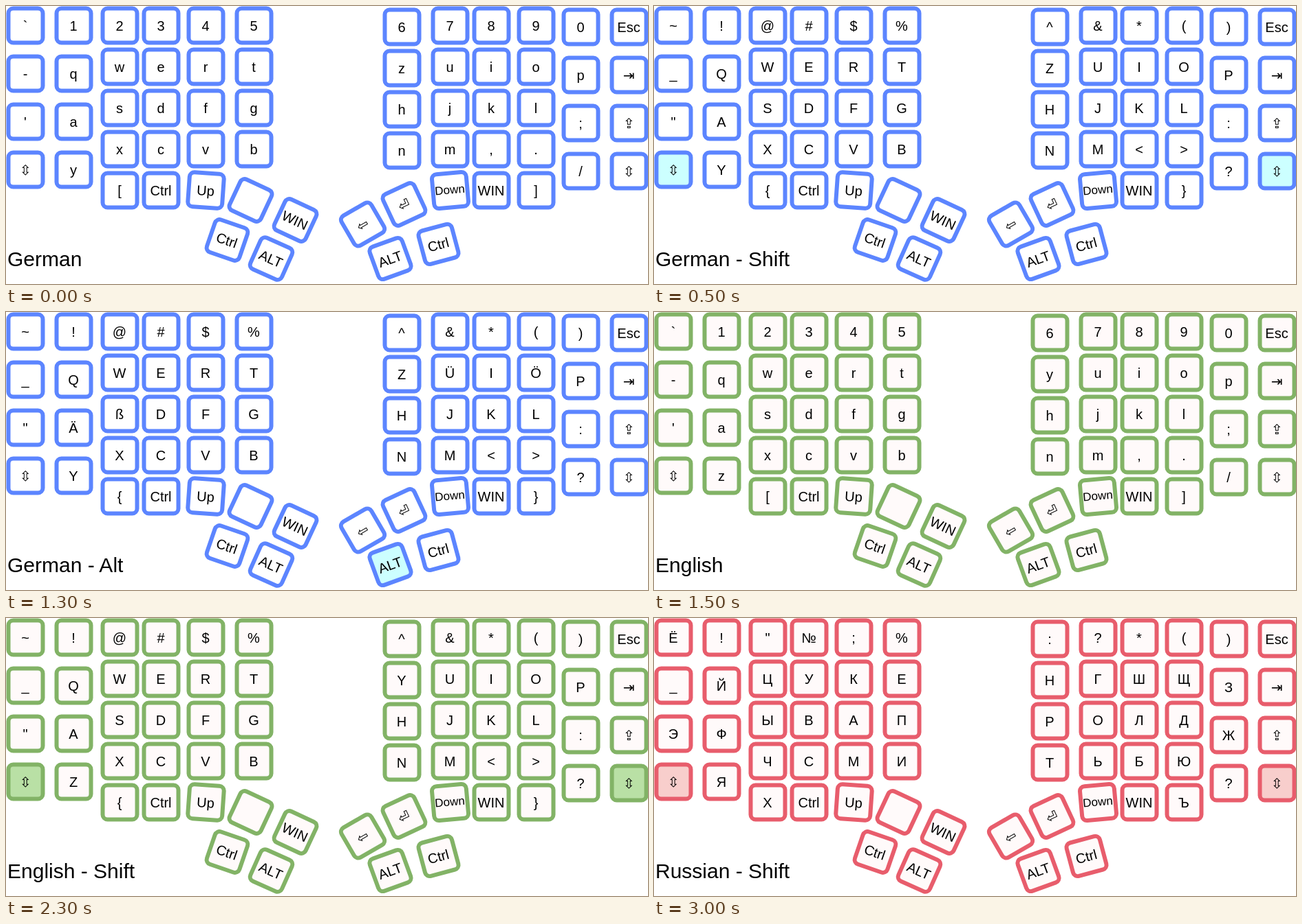
Animation of 933 by 405 pixels, one loop 3500 ms. Source, as an HTML page:

```html
<!DOCTYPE html>
<html lang="en">
<meta charset="utf-8">
<title>Keyboard layouts</title>
<style>
html, body { margin: 0; width: 100%; height: 100%; overflow: hidden; background: #fff; }
svg { display: block; font: 20px "Liberation Sans", "DejaVu Sans", sans-serif; }
rect { fill: var(--face); stroke: var(--edge); stroke-width: 6px; }
.on rect { fill: var(--lit); }
.key text { text-anchor: middle; }
#title { font-size: 30px; }
</style>
<svg id="board" width="933" height="405" viewBox="0 0 933 405"><text id="title" x="2" y="379"></text></svg>
<script>
const board = document.getElementById('board');
const title = document.getElementById('title');

const blue = ['#5c85ff', '#ffffff', '#ccffff'];
const green = ['#82b366', '#fffafa', '#b9e0a5'];
const red = ['#e85d6c', '#fffafa', '#f8cecc'];

// Characters run down each column, columns from left to right.
const layers = [
  ['German', blue, "`-' 1qay 2wsx[ 3edc 4rfv 5tgb 6zhn 7ujm 8ik, 9ol.] 0p;/"],
  ['German - Shift', blue, '~_" !QAY @WSX{ #EDC $RFV %TGB ^ZHN &UJM *IK< (OL>} )P:?', 'shift'],
  ['German - Alt', blue, '~_" !QÄY @WßX{ #EDC $RFV %TGB ^ZHN &ÜJM *IK< (ÖL>} )P:?', 'alt'],
  ['English', green, "`-' 1qaz 2wsx[ 3edc 4rfv 5tgb 6yhn 7ujm 8ik, 9ol.] 0p;/"],
  ['English - Shift', green, '~_" !QAZ @WSX{ #EDC $RFV %TGB ^YHN &UJM *IK< (OL>} )P:?', 'shift'],
  ['Russian', red, 'Ё-э 1йфя 2цычх 3увс 4кам 5епи 6нрт 7гоь 8шлб 9щдюъ 0зж/'],
  ['Russian - Shift', red, 'Ё_Э !ЙФЯ "ЦЫЧХ №УВС ;КАМ %ЕПИ :НРТ ?ГОЬ *ШЛБ (ЩДЮЪ )ЗЖ?', 'shift'],
];

// x, first y, row step, number of keys
const columns = [
  [28, 28, 70, 3], [98, 28, 70, 4], [165, 28, 60, 5], [225, 28, 60, 4],
  [290, 28, 60, 4], [360, 28, 60, 4], [575, 30, 60, 4], [645, 28, 60, 4],
  [705, 28, 60, 4], [770, 28, 60, 5], [835, 30, 70, 4],
];

// label, x, y, angle, role, font size
const fixedKeys = [
  ['⇳', 28, 238, 0, 'shift'], ['Ctrl', 225, 268], ['Up', 290, 268, 4],
  ['', 355, 282.5, 25], ['WIN', 420, 311.5, 25], ['Ctrl', 321, 340.5, 19],
  ['ALT', 385, 367.5, 24], ['⇦', 518, 317.5, -30], ['⏎', 578, 288.5, -25],
  ['Down', 645, 268, -5, '', 17], ['WIN', 705, 268], ['ALT', 558, 367.5, -20, 'alt'],
  ['Ctrl', 628, 346.5, -15], ['Esc', 905, 30], ['⇥', 905, 100],
  ['⇪', 905, 170], ['⇳', 905, 240, 0, 'shift'],
];

function add(parent, tag, attrs) {
  const node = document.createElementNS('http://www.w3.org/2000/svg', tag);
  for (const name in attrs) node.setAttribute(name, attrs[name]);
  return parent.appendChild(node);
}

function addKey(label, x, y, angle = 0, role = '', size = 20) {
  const key = add(board, 'g', {
    class: 'key', 'data-role': role,
    transform: `translate(${x + 0.5} ${y + 0.5}) rotate(${angle})`,
  });
  add(key, 'rect', { x: -25, y: -25, width: 50, height: 50, rx: 7 });
  const text = add(key, 'text', { x: -0.5, y: size < 20 ? 5 : 7.5, style: `font-size:${size}px` });
  text.textContent = label;
  return text;
}

const charKeys = columns.flatMap(([x, y, step, count]) =>
  Array.from({ length: count }, (_, row) => addKey('', x, y + row * step)));
fixedKeys.forEach(key => addKey(...key));
const modifiers = board.querySelectorAll('[data-role="shift"], [data-role="alt"]');

let shown = -1;
function frame(now) {
  const index = Math.floor(now / 500) % layers.length;
  if (index !== shown) {
    shown = index;
    const [name, colors, chars, held] = layers[index];
    title.textContent = name;
    ['--edge', '--face', '--lit'].forEach((prop, i) => board.style.setProperty(prop, colors[i]));
    const labels = [...chars.replaceAll(' ', '')];
    charKeys.forEach((text, i) => text.textContent = labels[i]);
    modifiers.forEach(key => key.classList.toggle('on', key.dataset.role === held));
  }
  requestAnimationFrame(frame);
}
frame(performance.now());
</script>
</html>
```
